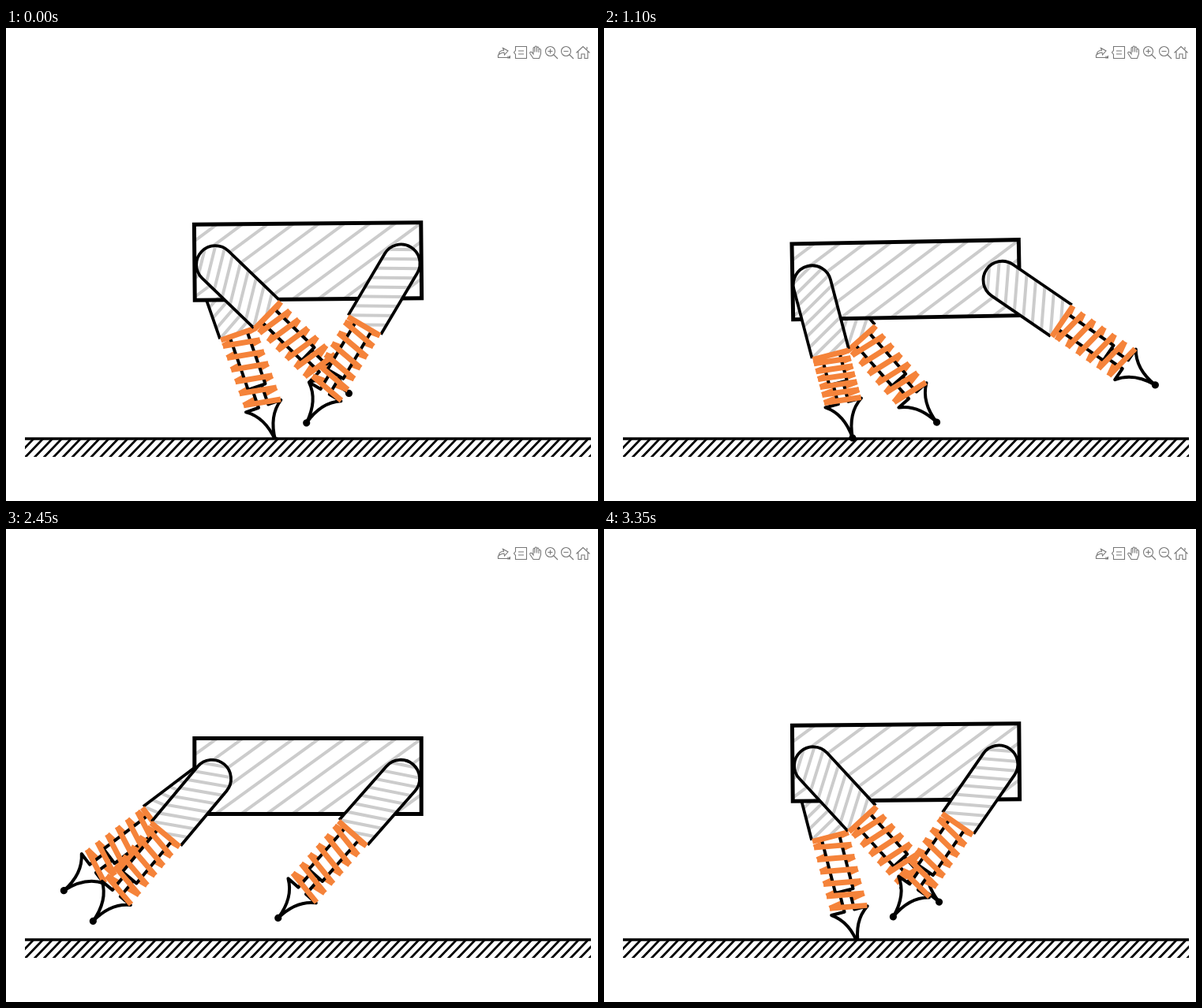
An HTML page with a canvas for the animation above (3400 ms loop, 750 by 600 pixels).

```html
<!DOCTYPE html>
<html lang="en">
<head>
<meta charset="utf-8">
<title>Running quadruped</title>
<style>
  html, body { margin: 0; width: 100%; height: 100%; overflow: hidden; background: #fff; }
  canvas { display: block; }
</style>
</head>
<body>
<canvas id="stage" width="750" height="600"></canvas>
<script>
const ctx = document.getElementById('stage').getContext('2d');
const PERIOD = 3400, STEP = 50, GROUND = 520;
const REACH = 238.2, THIGH = 93.7, HALF = 23.5, RAD = Math.PI / 180;
const ORANGE = '#f5833a', GREY = '#ccc';

// hip: offset from the body centre; mid: time of the forward swing's centre;
// lift and land are relative to mid; angles in degrees
const near  = { hip: -119.5, mid: 2894, amp: 57, rate: .0018,  bias: 1,   lift: -1313, land: 1437 };
const far   = { hip: -119.5, mid: 3215, amp: 55, rate: .0018,  bias: 1.2, lift: -1345, land: 1375 };
const front = { hip:  119.5, mid: 3723, amp: 56, rate: .00181, bias: .3,  lift: -1416, land: 1332 };

const mod = (a, n) => ((a % n) + n) % n;

function hermite(u, a, b, da, db) {
  const v = 1 - u;
  return a * v * v * (1 + 2 * u) + b * u * u * (3 - 2 * u) + da * u * v * v - db * u * u * v;
}

// Ballistic flight, then a smooth bounce while any foot is down
function bodyPose(t) {
  const start = 931, end = 2309, span = end - start, apex = 3396, k = 1.955e-5;
  const fall = s => 296 + k * s * s, speed = s => 2 * k * s;
  const turn = s => -9.45e-6 * (s - 2450);
  if (t > start && t < end) {
    const u = (t - start) / span, s0 = start + PERIOD - apex, s1 = end - apex;
    return {
      y: hermite(u, fall(s0), fall(s1), speed(s0) * span, speed(s1) * span) + 32 * (u * (1 - u)) ** 2,
      tilt: hermite(u, turn(start + PERIOD), turn(end), -.013, -.013)
    };
  }
  const s = t < end ? t + PERIOD : t;
  return { y: fall(s - apex), tilt: turn(s) };
}

function legPose(leg, t, body) {
  const x = 382.5 + leg.hip, y = body.y + 1 + leg.hip * body.tilt;
  const swing = s => (leg.bias + leg.amp * Math.sin(leg.rate * s)) * RAD;
  const s = mod(t - leg.mid + PERIOD / 2, PERIOD) - PERIOD / 2;
  if (s >= leg.lift && s <= leg.land) return { x, y, angle: swing(s), len: REACH };
  const u = mod(s - leg.land, PERIOD) / (PERIOD - leg.land + leg.lift);
  const from = REACH * Math.sin(swing(leg.land)), to = REACH * Math.sin(swing(leg.lift));
  const dx = from + (to - from) * u, dy = GROUND - y;
  return { x, y, angle: Math.atan2(dx, dy), len: Math.hypot(dx, dy) };
}

function stroke(path, width, color = '#000') {
  ctx.lineWidth = width;
  ctx.strokeStyle = color;
  ctx.stroke(path);
}

function fill(path, color = '#fff') {
  ctx.fillStyle = color;
  ctx.fill(path);
}

function hatch(area, degrees, first, gap) {
  const lines = new Path2D();
  for (let y = first; y < 170; y += gap) {
    lines.moveTo(-190, y);
    lines.lineTo(190, y);
  }
  ctx.save();
  ctx.clip(area);
  ctx.rotate(-degrees * RAD);
  stroke(lines, 4, GREY);
  ctx.restore();
}

function spring(end, side) {
  const top = 95.5, s = (end - top) / 12, coils = new Path2D();
  for (let i = 0; i < 6; i++) {
    const y = top + s * (2 * i + (side > 0 ? 1 : 0));
    coils.moveTo(-side * HALF, y);
    coils.lineTo(side * HALF, y + s);
  }
  if (side > 0) {
    coils.moveTo(-HALF, top);
    coils.lineTo(HALF, top);
  }
  stroke(coils, 7, ORANGE);
}

function drawLeg({ x, y, angle, len }) {
  const ankle = len - 46, bar = len - 72;
  ctx.save();
  ctx.translate(x, y);
  ctx.rotate(-angle);
  ctx.lineJoin = 'round';

  spring(ankle - 1, -1);

  const foot = new Path2D();
  foot.moveTo(-6.5, bar);
  foot.lineTo(-6.5, ankle);
  foot.lineTo(-HALF, ankle);
  foot.quadraticCurveTo(-2.5, len - 32, 0, len);
  foot.quadraticCurveTo(2.5, len - 32, HALF, ankle);
  foot.lineTo(6.5, ankle);
  foot.lineTo(6.5, bar);
  fill(foot);
  stroke(foot, 4);
  const tip = new Path2D();
  tip.arc(0, len, 4.6, 0, 7);
  fill(tip, '#000');

  const rod = new Path2D();
  rod.moveTo(-11.5, THIGH - 2);
  rod.lineTo(-11.5, bar);
  rod.lineTo(11.5, bar);
  rod.lineTo(11.5, THIGH - 2);
  fill(rod);
  stroke(rod, 4);

  const thigh = new Path2D();
  thigh.moveTo(-24, THIGH);
  thigh.arc(0, 3, 24, Math.PI, 0);
  thigh.lineTo(24, THIGH);
  fill(thigh);
  hatch(thigh, 30, -27, 12);
  stroke(thigh, 3.8);

  spring(ankle - 1, 1);
  ctx.restore();
}

function drawBody({ y, tilt }) {
  const box = new Path2D();
  box.rect(-143.7, -48, 287.4, 96);
  ctx.save();
  ctx.translate(382.5, y);
  ctx.rotate(tilt);
  fill(box);
  hatch(box, 36, -106.3, 19.06);
  stroke(box, 5);
  ctx.restore();
}

function drawGround() {
  const area = new Path2D(), lines = new Path2D(), top = new Path2D();
  area.rect(24, GROUND, 717, 24);
  for (let x = 0; x < 745; x += 11.91) {
    lines.moveTo(x, 545);
    lines.lineTo(x + 24, 520);
  }
  fill(area);
  ctx.save();
  ctx.clip(area);
  stroke(lines, 2.8);
  ctx.restore();
  top.moveTo(24, 521);
  top.lineTo(741, 521);
  stroke(top, 3.5);
}

const icons = new Path2D(
  // share
  'M623.5 33.5v4h12.5v-2 M624.5 33.5c0-4 3-5 6-5l-1-3 6.5 3.5-4.5 5-.5-3c-3 0-4 1-6.5 2.5z' +
  // note
  'M645.5 23.5h14v15h-14v-5l-2-2.5 2-2.5z M649 29h7 M649 33h7' +
  // hand
  'M668 38.5l-4-6c-1-2 1-3 2.5-1.5l1.5 2v-7c0-2 2-2 2 0v4.5-6c0-2 2.5-2 2.5 0v6-5c0-2 2.5-2 2.5 0v5.5-3c0-2 2.5-2 2.5 0v5l-2 5.5z' +
  // zoom in and out
  'M695.5 29.5a6 6 0 1 0-12 0a6 6 0 1 0 12 0 M694 34l5 5 M686.5 29.5h6 M689.5 26.5v6' +
  'M715.5 29.5a6 6 0 1 0-12 0a6 6 0 1 0 12 0 M714 34l5 5 M706.5 29.5h6' +
  // home
  'M722.5 31.5l8.5-8 8.5 8 M725 30v8.5h4v-5.5h4v5.5h4v-8.5 M736 27v-3');
const corner = new Path2D('M639 34.5v4h-4z');

function draw(now) {
  const t = Math.floor(now / STEP) * STEP % PERIOD;
  const body = bodyPose(t);
  ctx.fillStyle = '#fff';
  ctx.fillRect(0, 0, 750, 600);
  drawLeg(legPose(far, t, body));
  drawGround();
  drawBody(body);
  drawLeg(legPose(near, t, body));
  drawLeg(legPose(front, t, body));
  stroke(icons, 1.1, '#777');
  fill(corner, '#777');
}

let start;
function tick(now) {
  start ??= now;
  draw(now - start);
  requestAnimationFrame(tick);
}
requestAnimationFrame(tick);
</script>
</body>
</html>
```
